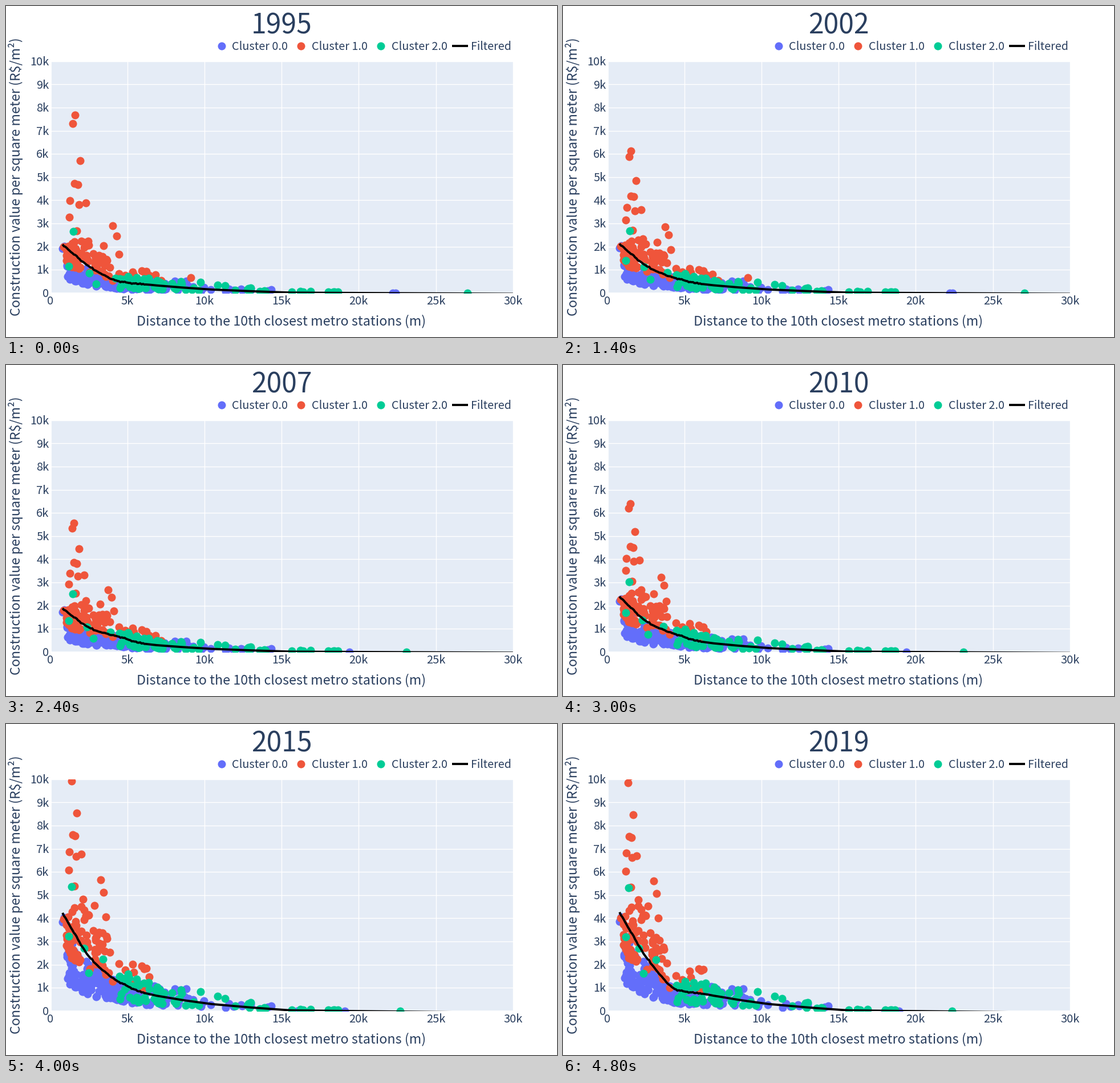
Recreate the animation shown at these times as a matplotlib script. Size 966 by 580 pixels, loop 5 s.

```python
import math

import numpy as np
import matplotlib.pyplot as plt
from matplotlib.animation import FuncAnimation
from matplotlib.lines import Line2D

W, H, DPI = 966, 580, 100
PT = 72 / DPI
LEFT, RIGHT, TOP, BASE = 77.5, 888.8, 96.8, 502.7
INK, PANEL = "#2a3f5f", "#e5ecf6"
COLORS = BLUE, RED, GREEN = "#636efa", "#ef553b", "#00cc96"
DOT = 14 * PT

# Values are in thousands on both axes. Each year maps to a fractional step,
# and the lists below hold one setting per whole step.
KEY_YEARS = [1995, 1998, 1999, 2001, 2002, 2007, 2009, 2010, 2013, 2014, 2018, 2019]
KEY_STEPS = [0, 0.7, 1, 1.15, 2, 3, 3, 4, 4, 5, 5, 6]
PEAK = [2.08, 2.13, 2.11, 1.87, 2.38, 4.22, 4.25]     # start of the curve
DIP = [0.06, 0.03, 0, -0.05, -0.02, 0, 0.08]          # sag of the curve near 4.3k
GAIN = [0.78, 1.02, 1.03, 1, 1.28, 2.55, 2.53]        # growth law of high points
POWER = [1.334, 1.12, 1.04, 1, 0.94, 0.81, 0.81]
SHRINK = [1.12, 1, 1, 1, 0.9, 0.82, 0.72]             # distances fall as lines open
RED_REACH = [10.7, 10.5, 10.5, 8, 6.7, 6.5, 6.3]
FAR_BLUE = [22.2, 22.2, 22.2, 18.2, 16.7, 16, 18]
FARTHER_BLUE = [22.4, 22.4, 22.4, 19.4, 19.4, 19.1, 18.9]
FAR_GREEN = [27.05, 27.05, 27.05, 23.1, 23.1, 22.7, 22.35]

PROFILE_X = [0.8, 1.3, 1.84, 2.42, 3.3, 4.35, 5.8, 6.9, 8.6, 10.45, 13, 15.6, 30]
PROFILE_Y = [1, 0.865, 0.72, 0.57, 0.43, 0.3, 0.195, 0.155, 0.11, 0.07, 0.035, 0.005, -0.02]

HIGH_RED = [(1.55, 5.55), (1.42, 5.35), (1.85, 4.44), (1.53, 3.85), (1.72, 3.82),
            (1.26, 3.4), (1.78, 3.28), (2.2, 3.33), (1.22, 2.92), (1.65, 2.52),
            (3.74, 2.67), (3.96, 2.36), (2.31, 2.2), (3.22, 2.05), (4.12, 1.77)]
HIGH_GREEN = [(1.45, 2.5), (1.2, 1.34), (2.4, 1.08), (2.8, 0.58), (3.9, 0.85)]

rng = np.random.default_rng(5)


def cloud(n, start, mean, end, low, high):
    """Random distances and multiples of the curve, between two bounds over x."""
    x = start + rng.exponential(mean, n)
    x = np.where(x > end, rng.uniform(start, end, n), x)
    bounds = [np.interp(x, [1, 2.3, 4.5, 10], b) for b in (low, high)]
    return x, rng.uniform(*bounds)


blue_cloud = cloud(210, 1.1, 3.6, 16, [0.32, 0.28, 0.3, 0.4], [0.85, 0.85, 1.1, 2.2])
red_cloud = cloud(90, 1.0, 2.3, 10.5, [0.58, 0.65, 0.9, 1.8], [1.0, 1.8, 2.1, 3.2])
green_cloud = cloud(60, 4.4, 4, 17, [0.4, 0.4, 0.4, 0.4], [1, 1, 1.4, 2.2])
edge_blue = np.array([0.78, 0.92]), np.array([0.9, 0.98])
edge_red = np.array([0.87]), np.array([0.95])
zero_green_x = rng.uniform(15.5, 18.8, 6)
line_x = np.concatenate([np.linspace(0.8, 6.2, 60), np.linspace(6.5, 30, 60)])
wobble = rng.normal(0, 0.016, line_x.size) * (line_x < 6.3)


def at_step(values, step):
    return float(np.interp(step, range(len(values)), values))


def curve(x, step):
    sag = at_step(DIP, step) * np.exp(-((x - 4.3) / 1.2) ** 2)
    return at_step(PEAK, step) * (np.interp(x, PROFILE_X, PROFILE_Y) - sag)


def along_curve(points, step):
    x, ratio = points
    return np.column_stack([x, ratio * (np.maximum(curve(x, step), 0) + 0.04)])


def grown(points, step):
    x, y = np.array(points).T
    x = 1.2 + (x - 1.2) * SHRINK[int(step)]
    return np.column_stack([x, at_step(GAIN, step) * y ** at_step(POWER, step)])


fig = plt.figure(figsize=(W / DPI, H / DPI), dpi=DPI, facecolor="white")
ax = fig.add_axes([LEFT / W, 1 - BASE / H, (RIGHT - LEFT) / W, (BASE - TOP) / H])
ax.set(xlim=(0, 30), ylim=(0, 10), facecolor=PANEL, xticks=[], yticks=[])
ax.spines[:].set_visible(False)


def label(x, y, text, size, ha="center", **kw):
    return fig.text(x / W, 1 - y / H, text, fontsize=size * PT, ha=ha, va="baseline",
                    color=INK, family="Noto Sans CJK JP", parse_math=False, **kw)


def legend_mark(xs, y, **style):
    fig.add_artist(Line2D([x / W for x in xs], [1 - y / H] * len(xs), **style))


for i in range(7):
    ax.axvline(5 * i, color="white", lw=(1.4 if i else 2.8) * PT, zorder=1)
    label(LEFT + i * (RIGHT - LEFT) / 6, 523, f"{5 * i}k" if i else "0", 20)
for i in range(11):
    ax.axhline(i, color="white", lw=(1.4 if i else 2.8) * PT, zorder=1)
    label(75.5, BASE - i * (BASE - TOP) / 10 + 7.3, f"{i}k" if i else "0", 20, ha="right")

label(483, 559, "Distance to the 10th closest metro stations (m)", 23.3)
label(25, 299.5, "Construction value per square meter (R$/m²)", 23.3,
      rotation=90, rotation_mode="anchor")
for i, color in enumerate(COLORS):
    x = 377.5 + 139.5 * i
    legend_mark([x], 69.7, marker="o", ms=DOT, mfc=color, mew=0)
    label(x + 19, 77, f"Cluster {i}.0", 19.8, ha="left")
legend_mark([781.5, 810], 69.7, color="black", lw=3.9 * PT, solid_capstyle="butt")
label(815, 77, "Filtered", 19.7, ha="left")

title = label(483, 48.5, "", 48)
blue_dots, red_dots, green_dots = (
    ax.scatter([], [], s=DOT ** 2, c=c, lw=0, zorder=z) for z, c in enumerate(COLORS, 2))
filtered, = ax.plot([], [], color="black", lw=3.9 * PT, zorder=6, solid_capstyle="butt")


def update(frame):
    year = 1995 + frame
    step = float(np.interp(year, KEY_YEARS, KEY_STEPS))
    far = math.ceil(step)
    reds = along_curve(red_cloud, step)
    reds = reds[reds[:, 0] < RED_REACH[int(step)]]
    zero_green = np.column_stack([zero_green_x, np.full_like(zero_green_x, 0.03)])

    title.set_text(str(year))
    blue_dots.set_offsets(np.vstack([
        along_curve(blue_cloud, step), along_curve(edge_blue, step),
        [(FAR_BLUE[far], 0), (FARTHER_BLUE[far], 0)]]))
    red_dots.set_offsets(np.vstack([reds, along_curve(edge_red, step), grown(HIGH_RED, step)]))
    green_dots.set_offsets(np.vstack([
        along_curve(green_cloud, step), zero_green, grown(HIGH_GREEN, step),
        [(FAR_GREEN[far], 0)]]))
    filtered.set_data(line_x, curve(line_x, step) + wobble)
    return title, blue_dots, red_dots, green_dots, filtered


anim = FuncAnimation(fig, update, frames=25, interval=200, repeat=True, repeat_delay=0)
plt.show()
```
